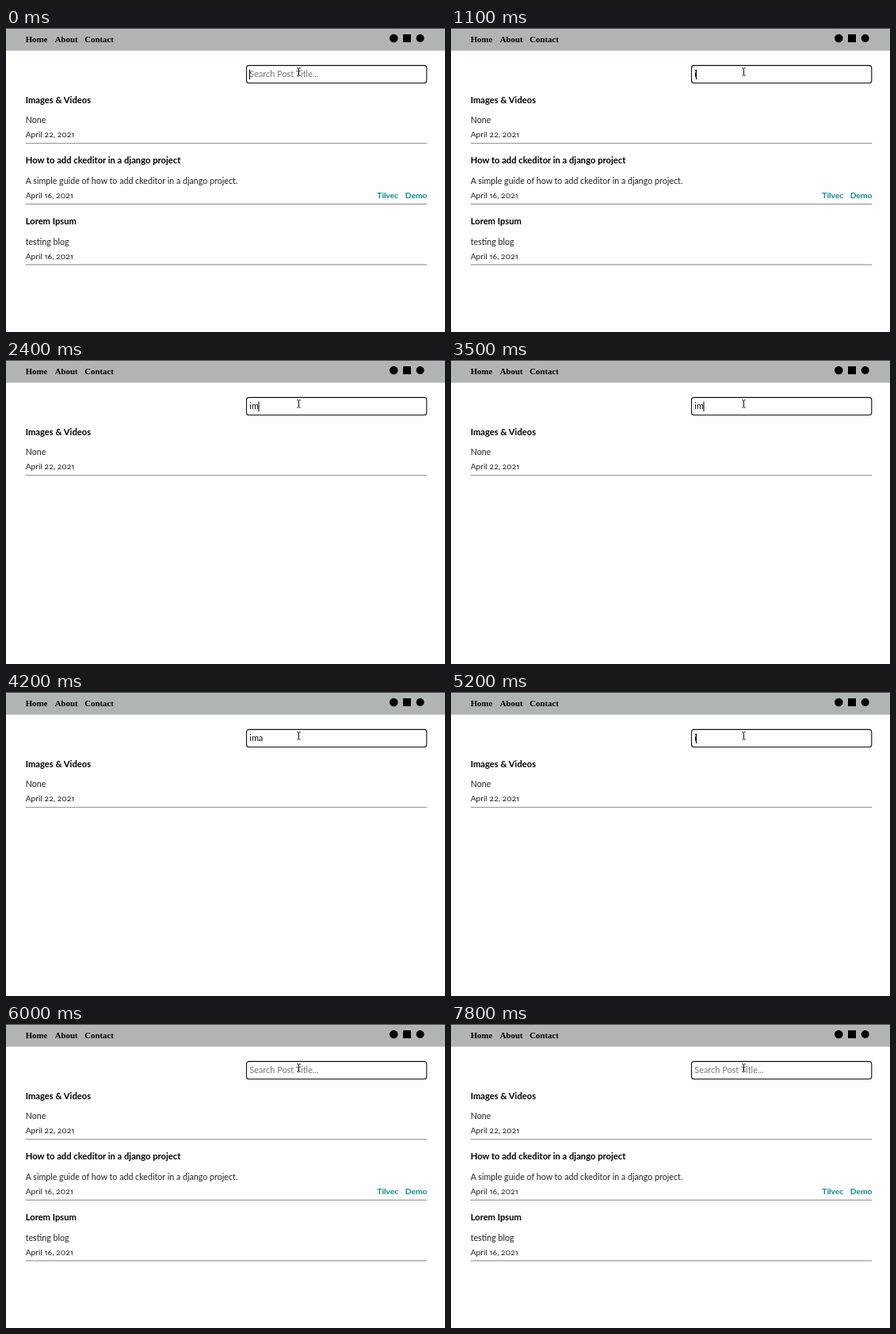
An HTML page that plays this animation: 554 by 384 pixels, repeating every 8 s.

```html
<!DOCTYPE html>
<html lang="en">
<head>
<meta charset="utf-8">
<title>Post search</title>
<style>
html, body { margin: 0; width: 100%; height: 100%; overflow: hidden; background: #fefefe; }
svg { display: block; width: 554px; height: 384px; }
text { font: 10.68px Lato, sans-serif; fill: #222; white-space: pre; font-feature-settings: "onum", "pnum"; }
.nav { font: bold 10.8px "Liberation Serif", serif; fill: #000; }
.title { font-size: 11.2px; font-weight: bold; fill: #000; }
.link { font-size: 10.3px; font-weight: bold; fill: #118a8f; }
.date { font-size: 10.25px; }
#query { font-size: 10.9px; }
</style>
</head>
<body>
<svg id="stage" viewBox="0 0 554 384">
  <rect width="554" height="384" fill="#fefefe"/>
  <rect y="28" width="554" height="1" fill="#cdd0cf"/>
  <rect width="554" height="28" fill="#b0b5b3"/>
  <rect width="554" height="1" fill="#454847"/>
  <text class="nav" x="24.7" y="18">Home</text>
  <text class="nav" x="61.7" y="18">About</text>
  <text class="nav" x="99.3" y="18">Contact</text>
  <circle cx="489.3" cy="13" r="5.3"/>
  <rect x="501" y="8" width="10" height="10"/>
  <circle cx="522.7" cy="13" r="5"/>
  <rect x="303.5" y="47.4" width="227.3" height="22.1" rx="3" fill="#fefefe" stroke="#111" stroke-width="1.1"/>
  <text id="query" x="307.3" y="62"></text>
  <rect id="caret" y="52.5" width="1" height="12.5"/>
  <path d="M367.3 50.5H369M370 50.5H371.7M369.5 51V59.5M367.3 60H369M370 60H371.7" fill="none" stroke="#111"/>
  <g id="posts"></g>
</svg>
<script>
const LOOP = 8000;
const el = id => document.getElementById(id);
const query = el("query"), caret = el("caret"), posts = el("posts");

const data = [
  ["Images & Videos", "None", "April 22, 2021"],
  ["How to add ckeditor in a django project",
   "A simple guide of how to add ckeditor in a django project.", "April 16, 2021", true],
  ["Lorem Ipsum", "testing blog", "April 16, 2021"]
];

function add(parent, tag, attrs, text = "") {
  const node = document.createElementNS("http://www.w3.org/2000/svg", tag);
  for (const key in attrs) node.setAttribute(key, attrs[key]);
  node.textContent = text;
  return parent.appendChild(node);
}

const groups = data.map(([title, body, date, links], i) => {
  const g = add(posts, "g", {}), y = i * 76.65;
  add(g, "text", { class: "title", x: 24.7, y: 94.6 + y }, title);
  add(g, "text", { x: 24.7, y: 120.3 + y }, body);
  add(g, "text", { class: "date", x: 24.7, y: 138.3 + y }, date);
  if (links) {
    add(g, "text", { class: "link", x: 468.3, y: 138.3 + y }, "Tilvec");
    add(g, "text", { class: "link", x: 531.5, y: 138.3 + y, "text-anchor": "end" }, "Demo");
  }
  add(g, "rect", { x: 24.7, y: 145.2 + y, width: 506.6, height: 1, fill: "#858887" });
  return g;
});

// [start time, typed text]
const typed = [[0, ""], [700, "i"], [2300, "im"], [3600, "ima"], [5000, "im"], [5200, "i"], [5400, ""]];
// Times at which the caret turns on or off, starting from on
const blinks = [400, 700, 1300, 1900, 2900, 3500, 4200, 4800, 6000, 6600, 7200];
const caretX = [307, 309, 318.5, 324];

function draw(t) {
  const text = typed.filter(k => k[0] <= t).pop()[1];
  query.textContent = text || "Search Post Title...";
  query.style.fill = text ? "#111" : "#777";
  caret.setAttribute("x", caretX[text.length]);
  caret.style.opacity = blinks.filter(b => b <= t).length % 2 ? 0 : 1;
  const filtered = t >= 2400 && t < 5300;
  groups.forEach((g, i) => g.style.display = filtered && i ? "none" : "");
}

const start = performance.now();
function tick(now) {
  draw(Math.max(0, now - start) % LOOP);
  requestAnimationFrame(tick);
}
draw(0);
requestAnimationFrame(tick);
</script>
</body>
</html>
```
